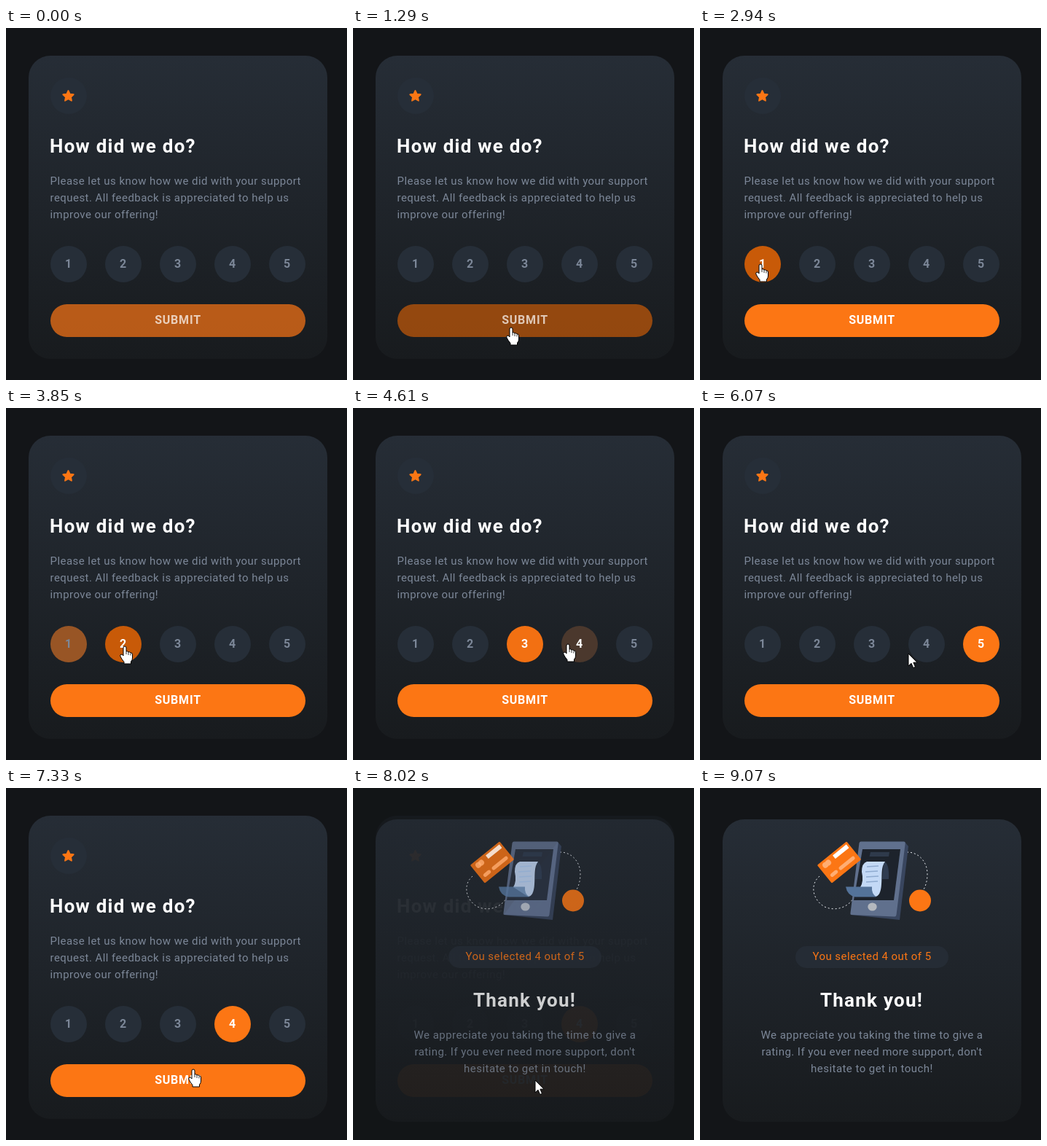
These frames come from a looping animation (468x483 px, 9.96 s). An HTML page with a canvas:

```html
<!DOCTYPE html>
<html lang="en">
<head>
<meta charset="utf-8">
<title>Rating card</title>
<style>
html, body { margin: 0; width: 100%; height: 100%; overflow: hidden; background: #131518; }
canvas { display: block; }
</style>
</head>
<body>
<canvas id="stage" width="468" height="483"></canvas>
<script>
const ctx = document.getElementById('stage').getContext('2d');
const LOOP = 9960, FADE = 300, SUBMIT_AT = 7880, SWAP = 180;
const FONT = 'Roboto, "Open Sans", sans-serif';
const ORANGE = [252, 118, 20], DARK_ORANGE = [200, 90, 8], SLATE = [38, 46, 56];
const GREY = '#7c8798', WHITE = '#fff';
const rgb = c => `rgb(${c.map(Math.round).join()})`;

// Pointer path: time, x, y
const PATH = [
  [560, 447, 484], [800, 400, 440], [1000, 300, 408], [1290, 217, 411],
  [1540, 180, 462], [1590, 180, 462], [1900, 150, 410], [2200, 105, 360],
  [2570, 83, 324], [3000, 83, 324], [3400, 155, 328], [3740, 157, 327],
  [3800, 157, 327], [4050, 226, 326], [4300, 232, 326], [4610, 295, 324],
  [4800, 306, 325], [4900, 306, 325], [5200, 380, 328], [5450, 384, 328],
  [5740, 387, 350], [5920, 311, 351], [6070, 286, 337], [6430, 308, 330],
  [6640, 308, 330], [6900, 260, 368], [7080, 211, 392], [7330, 257, 386],
  [7570, 250, 401], [8930, 250, 402], [9070, 300, 484]
];
const CLICKS = [[2740, 0], [3760, 1], [4250, 2], [4830, 3], [5350, 4], [6610, 3]];
const circleX = i => 86 + 75 * i;

function slope(i, axis) {
  const a = PATH[i - 1], b = PATH[i], c = PATH[i + 1];
  if (!a || !c || Math.hypot(b[1] - a[1], b[2] - a[2]) < 2 ||
      Math.hypot(c[1] - b[1], c[2] - b[2]) < 2) return 0;
  return (c[axis] - a[axis]) / (c[0] - a[0]);
}

function pointer(t) {
  const i = PATH.findIndex((k, n) => n < PATH.length - 1 && t >= k[0] && t < PATH[n + 1][0]);
  if (i < 0) return null;
  const a = PATH[i], b = PATH[i + 1], d = b[0] - a[0], u = (t - a[0]) / d;
  const at = axis => {
    const s = u * u * (3 - 2 * u);
    return a[axis] + (b[axis] - a[axis]) * s +
      d * (slope(i, axis) * u * (1 - u) ** 2 - slope(i + 1, axis) * u * u * (1 - u));
  };
  return { x: at(1), y: at(2) };
}

// 0-4: rating circles, 5: submit button, -1: nothing
function hit(p) {
  if (!p) return -1;
  for (let i = 0; i < 5; i++) if (Math.hypot(p.x - circleX(i), p.y - 324) < 25) return i;
  return p.x > 61 && p.x < 411 && p.y > 379 && p.y < 424 ? 5 : -1;
}

function selected(t) {
  let s = -1;
  for (const [time, i] of CLICKS) if (t >= time) s = i;
  return s;
}

function target(i, t, hover) {
  const chosen = selected(t);
  if (i === 5) return hover === 5 && chosen < 0 ? DARK_ORANGE : ORANGE;
  return hover === i ? DARK_ORANGE : chosen === i ? ORANGE : SLATE;
}

// Colour changes of every control, found once by walking the path
const changes = [0, 1, 2, 3, 4, 5].map(i => [[-FADE, i === 5 ? ORANGE : SLATE]]);
for (let t = 0; t < SUBMIT_AT; t += 10) {
  const hover = hit(pointer(t));
  changes.forEach((list, i) => {
    const c = target(i, t, hover);
    if (list[list.length - 1][1] !== c) list.push([t, c]);
  });
}

const ease = u => 1 - (1 - Math.min(1, u) ** 1.4) ** 3;

function colour(i, t) {
  const list = changes[i].filter(e => e[0] <= t);
  let c = list[0][1];
  for (let n = 1; n < list.length; n++) {
    const end = n + 1 < list.length ? list[n + 1][0] : t;
    const k = ease((end - list[n][0]) / FADE);
    c = c.map((v, j) => v + (list[n][1][j] - v) * k);
  }
  return rgb(c);
}

function text(str, x, y, size, fill, { weight = 400, spacing = 0.45, align = 'left' } = {}) {
  ctx.font = `${weight} ${size}px ${FONT}`;
  ctx.letterSpacing = spacing + 'px';
  ctx.textAlign = align;
  ctx.fillStyle = fill;
  ctx.fillText(str, x, y);
}

function box(x, y, w, h, r, fill) {
  ctx.fillStyle = fill;
  ctx.beginPath();
  ctx.roundRect(x, y, w, h, r);
  ctx.fill();
}

function disc(x, y, r, fill) {
  box(x - r, y - r, 2 * r, 2 * r, r, fill);
}

function shape(d, fill, stroke, width = 1) {
  const p = new Path2D(d);
  if (fill) { ctx.fillStyle = fill; ctx.fill(p); }
  if (stroke) { ctx.strokeStyle = stroke; ctx.lineWidth = width; ctx.stroke(p); }
}

function panel(y, h) {
  const g = ctx.createLinearGradient(0, y, 0, y + h);
  g.addColorStop(0, '#262d36');
  g.addColorStop(1, '#181b1e');
  box(31, y, 410, h, 30, g);
}

function star(x, y) {
  ctx.beginPath();
  for (let i = 0; i < 10; i++) {
    const a = i * Math.PI / 5 - Math.PI / 2, r = i % 2 ? 3.7 : 7.6;
    ctx.lineTo(x + r * Math.cos(a), y + r * Math.sin(a));
  }
  ctx.closePath();
  ctx.lineJoin = 'round';
  ctx.lineWidth = 1.8;
  ctx.fillStyle = ctx.strokeStyle = rgb(ORANGE);
  ctx.fill();
  ctx.stroke();
}

function ratingCard(t) {
  panel(38, 416);
  disc(86, 93, 25, rgb(SLATE));
  star(85.5, 93.6);
  text('How did we do?', 60, 171, 26, WHITE, { weight: 700, spacing: 1.25 });
  ['Please let us know how we did with your support',
   'request. All feedback is appreciated to help us',
   'improve our offering!'].forEach((s, i) => text(s, 60.5, 215 + 23 * i, 15, GREY));

  const hover = hit(pointer(t)), chosen = selected(t);
  for (let i = 0; i < 5; i++) {
    disc(circleX(i), 324, 25, colour(i, t));
    const lit = i === hover || i === chosen;
    text(String(i + 1), circleX(i) - 0.5, 329, 16, lit ? WHITE : GREY,
      { weight: 700, spacing: 0, align: 'center' });
  }

  ctx.save();
  if (chosen < 0) ctx.globalAlpha *= 0.7;
  box(61, 379, 350, 45, 22.5, colour(5, t));
  text('SUBMIT', 236, 406, 16, WHITE, { weight: 700, spacing: 0.8, align: 'center' });
  ctx.restore();
}

function illustration() {
  ctx.save();
  ctx.setLineDash([2, 3]);
  shape('M164 121C150 133 155 154 171 163C187 170 203 163 210 152M284 88C301 88 312 102 312 118C312 127 310 134 306 141',
    null, '#e8ebf0', 1);
  ctx.restore();

  // Phone
  shape('M281 74L286 80L274 181L207 174Z', '#39465f');
  shape('M221 73.5H280Q282 73.5 281.7 76L269.5 174Q269 176.500 267 176.500L208 174Q206 174 206.400 172L218.500 75.500Q219 73.500 221 73.500Z', '#60708d');
  shape('M223 84H275L266 154H211Z', '#1d232c');
  shape('M234 88H260L259 94H232.500Z', '#2e3a4b');
  ctx.fillStyle = '#b4b8be';
  ctx.beginPath();
  ctx.ellipse(236.5, 163, 6.2, 5.6, 0, 0, 7);
  ctx.fill();

  // Receipt
  shape('M252 101Q260 102 259 125H250Z', '#2f3c50');
  shape('M229 101H254C248 108 250 122 249 132Q248 149 240 149L220 136Q225 128 222 115Q222 103 229 101Z', '#c3d9f6');
  shape('M200 135.500H236Q235 145 242 149.500H213Q202 147 200 135.500Z', '#54739a');
  shape('M229 108L245 107M227 115L244 114M228 122L245 121M228 129L244 128', null, '#8fabd0', 1.3);

  // Payment card
  ctx.save();
  ctx.translate(191, 102);
  ctx.rotate(-0.68);
  box(-26, -16, 52, 32, 1.5, rgb(ORANGE));
  box(-1, -13, 24, 6, 0.5, WHITE);
  const pale = '#ffad72';
  disc(-17, -9, 4, pale);
  disc(-12, -9, 4, pale);
  box(-21, 5, 12, 5, 2.5, pale);
  box(-6, 5, 27, 5, 2.5, pale);
  ctx.restore();

  disc(302, 154.5, 15, rgb(ORANGE));
}

function thanksCard() {
  const mid = { align: 'center' };
  panel(43, 415);
  illustration();
  box(131, 217, 210, 30, 15, '#252c35');
  text('You selected 4 out of 5', 236, 236, 15, rgb(ORANGE), mid);
  text('Thank you!', 235.5, 300, 26, WHITE, { weight: 700, spacing: 1.25, align: 'center' });
  ['We appreciate you taking the time to give a',
   'rating. If you ever need more support, don\'t',
   'hesitate to get in touch!'].forEach((s, i) => text(s, 236, 344 + 23 * i, 15, GREY, mid));
}

const HAND = 'M-2 13V2Q-2 0 0 0Q2 0 2 2V7Q4 6 5 8Q7 7 8 9Q10.500 8.500 10.500 11V16Q10.500 19 8.500 21V24H-1V21.500Q-4 18 -6 14Q-7 11.500 -5 11Q-3 11 -2 13Z';
const ARROW = 'M0 0V17L4 13.300L6.700 19.500L9.500 18.300L6.900 12.200H12Z';

function cursor(p, hand) {
  ctx.save();
  ctx.translate(Math.round(p.x), Math.round(p.y));
  ctx.lineJoin = 'round';
  shape(hand ? HAND : ARROW, WHITE, '#000', 1);
  if (hand) shape('M2 7V11M5 8V12M8 9.500V12.500', null, '#000', 0.8);
  ctx.restore();
}

function draw(t) {
  ctx.globalAlpha = 1;
  ctx.fillStyle = '#131518';
  ctx.fillRect(0, 0, 468, 483);
  const k = Math.max(0, Math.min(1, (t - SUBMIT_AT) / SWAP));
  if (k < 1) ratingCard(t);
  if (k > 0) {
    ctx.globalAlpha = k;
    ctx.fillStyle = '#131518';
    ctx.fillRect(0, 0, 468, 483);
    thanksCard();
    ctx.globalAlpha = 1;
  }
  const p = pointer(t);
  if (p) cursor(p, t < SUBMIT_AT && hit(p) >= 0);
}

const start = performance.now();
function tick() {
  draw((performance.now() - start) % LOOP);
  requestAnimationFrame(tick);
}
tick();
</script>
</body>
</html>
```
